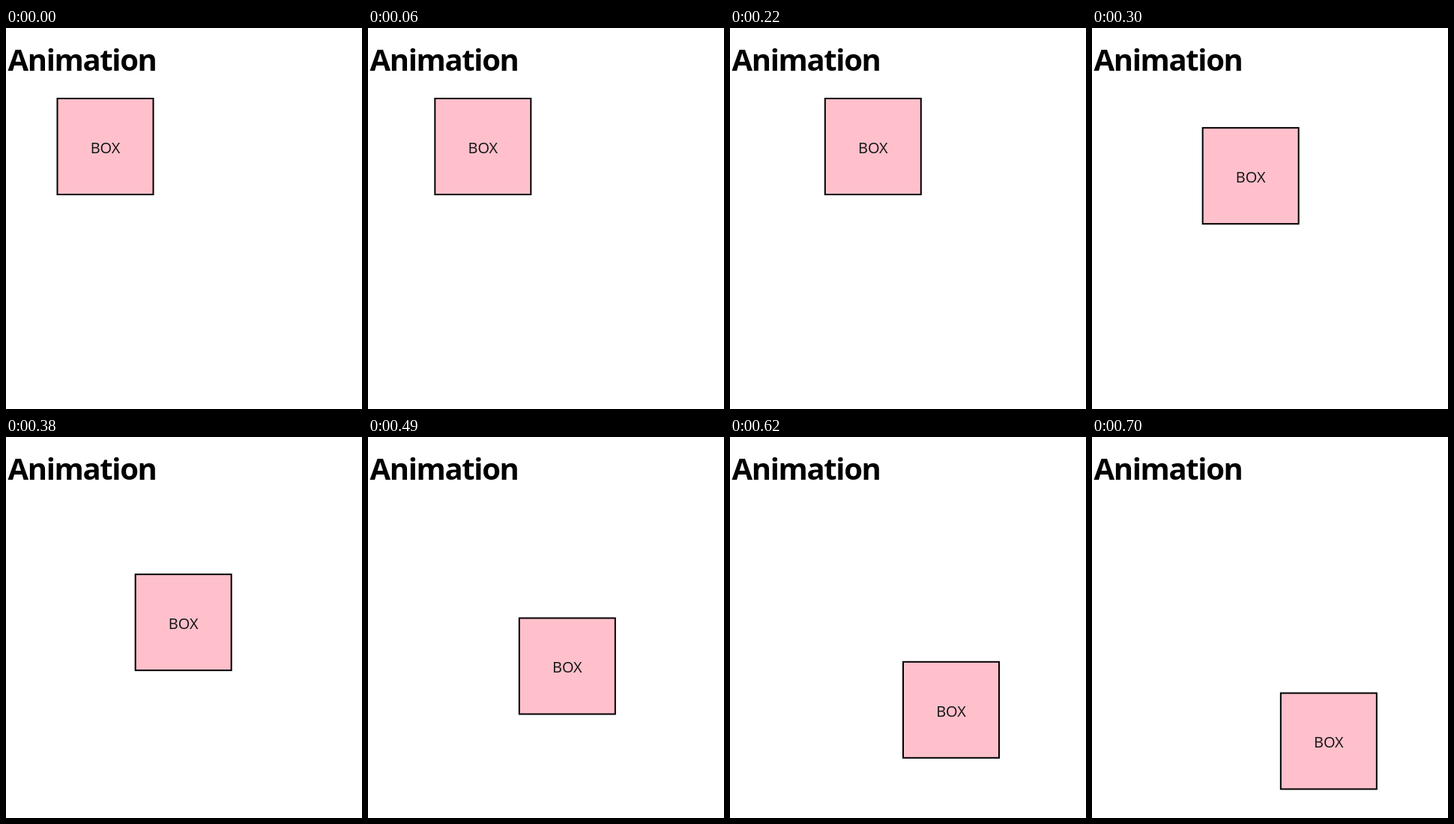
An HTML page that plays this animation: 475x508 px, repeating every 0.73 s.

```html
<!DOCTYPE html>
<html lang="en">
<head>
<meta charset="utf-8">
<title>Animation</title>
<style>
  html, body { margin: 0; width: 100%; height: 100%; overflow: hidden; background: #fff; }
  svg { display: block; font-family: "Open Sans", "Noto Sans", sans-serif; }
  .title { font-size: 40px; font-weight: 700; letter-spacing: -1.35px; }
  .label { font-size: 20px; text-anchor: middle; fill: #111; }
  rect { fill: #ffc0cb; stroke: #000; stroke-width: 2; }
</style>
</head>
<body>
<svg width="475" height="508" viewBox="0 0 475 508">
  <text class="title" x="2.5" y="56.5">Animation</text>
  <g id="box">
    <rect x="1" y="1" width="128" height="128"/>
    <text class="label" x="65" y="74">BOX</text>
  </g>
</svg>
<script>
  const LOOP = 730;
  // Uneven sampling of a steady 60 Hz motion: when each pose appears and its tick.
  const times = [0, 30, 60, 110, 140, 190, 220, 270, 300, 330, 380, 430, 460, 490, 540, 570, 620, 670, 700];
  const ticks = [0, 2, 5, 7, 10, 12, 14, 17, 19, 22, 25, 27, 30, 32, 34, 37, 39, 42, 44];
  const SPEED = 250 / 60, START_X = 67.5, START_Y = 93, TURN_X = 127.1;
  const box = document.getElementById("box");

  function draw(now) {
    const t = now % LOOP;
    const tick = ticks[times.findLastIndex(start => start <= t)];
    const x = START_X + SPEED * tick;
    const y = START_Y + 2 * Math.max(0, x - TURN_X);
    box.setAttribute("transform", `translate(${x} ${y})`);
  }

  const origin = performance.now();
  function loop() {
    draw(performance.now() - origin);
    requestAnimationFrame(loop);
  }
  loop();
</script>
</body>
</html>
```
